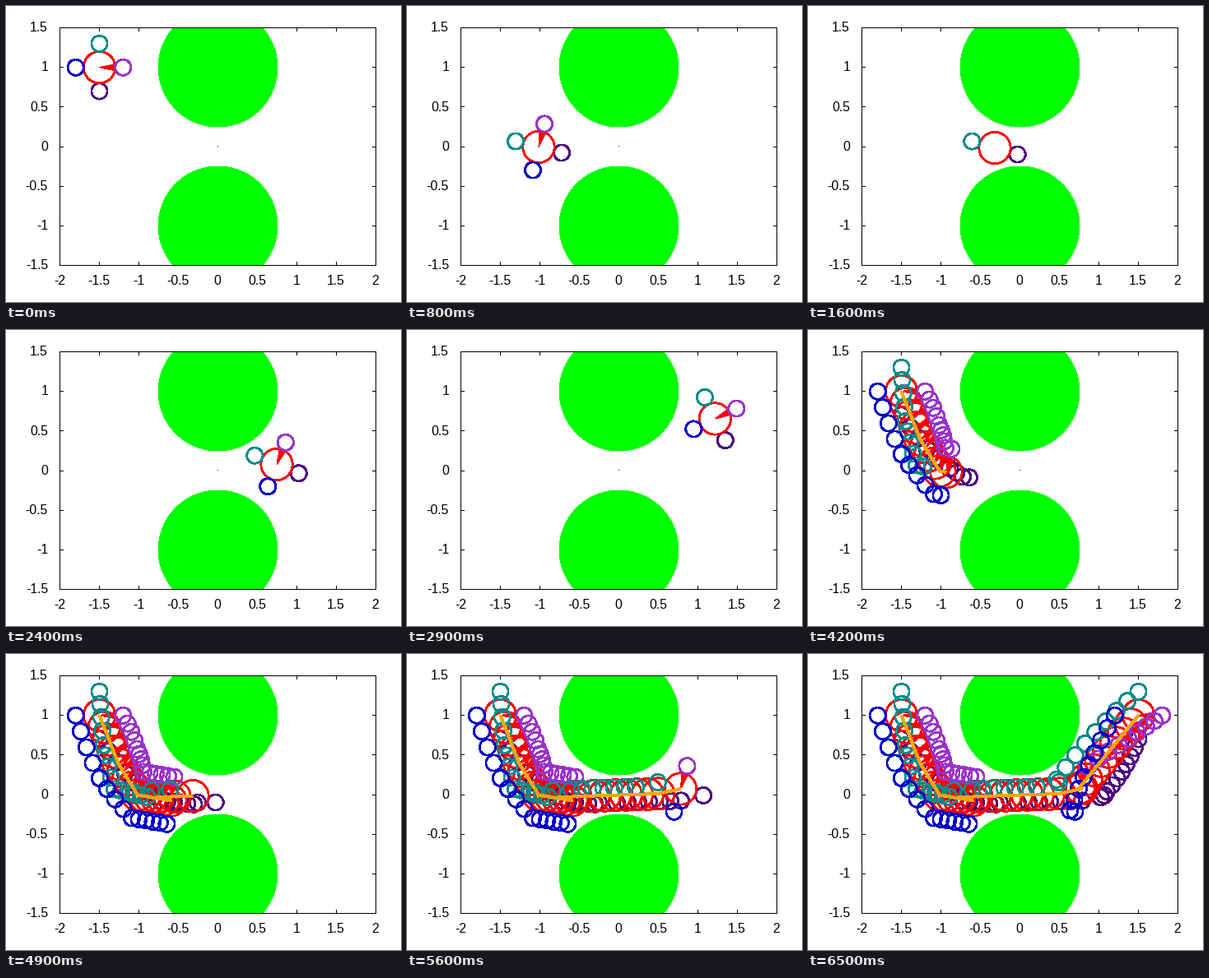
Write a matplotlib script that moves like this. It is 480 px wide and 360 px high and loops after 6.6 s.

```python
import numpy as np
import matplotlib.pyplot as plt
from matplotlib.animation import FuncAnimation
from matplotlib.patches import Circle, Rectangle, Wedge

W, H, DPI = 480, 360, 80
PT = 72 / DPI  # points per pixel
LEFT, RIGHT, TOP, BOTTOM = 65, 449, 26, 315
UNIT = (RIGHT - LEFT) / 4
BODY, ARM, REACH = .2, .1, .3
# colour, angle from heading, z-order
ARMS = [("#4b0082", -90, 3), ("#9932cc", 0, 5),
        ("#008b8b", 90, 6), ("#0000cd", 180, 7)]


def leg(steps, *points):
    """Straight moves through (x, y, heading), with a step count for each."""
    at = np.cumsum([0, *steps])
    return [[np.interp(k, at, col) for col in zip(*points)]
            for k in range(at[-1] + 1)]


def px(x):
    return LEFT + (x + 2) * UNIT


def py(y):
    return BOTTOM - (y + 1.5) * (BOTTOM - TOP) / 3


approach = leg((4, 4, 5), (-1.5, 1, 0), (-1.26, .39, 38),
               (-1.016, -.005, 76), (-.6, -.075, 81))
gap = leg((2, 6), (-.776, -.033, 77), (-.318, -.016, 74), (.5, .011, 73))
leave = leg((1, 8), (.781, .073, 74), (.745, .078, 68), (1.5, 1, 0))
poses = approach + gap + leave
STEPS = len(poses)

fig = plt.figure(figsize=(W / DPI, H / DPI), dpi=DPI, facecolor="white")
ax = fig.add_axes([0, 0, 1, 1])
ax.set_xlim(0, W)
ax.set_ylim(H, 0)
ax.axis("off")


def add(shape, z):
    shape.set(antialiased=False, zorder=z)
    return ax.add_patch(shape)


def ring(x, y, r, color, z):
    return add(Circle((px(x) + .5, py(y) + .5), r * UNIT, fill=False,
                      ec=color, lw=1.7 * PT), z)


def tick(x, y, dx, dy):
    ax.plot([x, x + dx], [y, y + dy], color="black", lw=PT,
            antialiased=False, zorder=.5)


def draw_plot():
    box = (LEFT, TOP), RIGHT - LEFT, BOTTOM - TOP
    for y in (-1, 1):
        disc = add(Circle((px(0) + .5, py(y) + .5), .75 * UNIT + .3,
                          fc="#00ff00", lw=0), 1)
        disc.set_clip_path(Rectangle(*box, transform=ax.transData))
    add(Rectangle(*box, fill=False, ec="black", lw=PT), 10)
    add(Rectangle((px(0), 170), 1, 1, fc="black", lw=0), 1)

    font = dict(family="Liberation Sans", size=15.7 * PT, color="black")
    for v in np.arange(-2, 2.1, .5):
        x = px(v)
        tick(x, BOTTOM, 0, -4)
        tick(x, TOP, 0, 4)
        ax.text(x, 339.4, f"{v:g}", ha="center", va="baseline", **font)
    for v in np.arange(-1.5, 1.6, .5):
        y = py(v)
        tick(LEFT, y, 4, 0)
        tick(RIGHT, y, -4, 0)
        ax.text(51, y + 5.2, f"{v:g}", ha="right", va="baseline", **font)


def make_robot(x, y, heading, folded):
    parts = [ring(x, y, BODY, "red", 4)]
    if not folded:
        # the y axis points down, so angles are negated
        parts.append(add(Wedge((px(x) + .5, py(y) + .5), BODY * UNIT,
                               -heading - 12, -heading + 12,
                               fc="red", lw=0), 4))
    for color, turn, z in ARMS:
        if folded and turn in (0, 180):
            continue
        a = np.radians(heading + turn)
        parts.append(ring(x + REACH * np.cos(a), y + REACH * np.sin(a),
                          ARM, color, z))
    return parts


draw_plot()
robots = [make_robot(*pose, pose in gap) for pose in poses]
xs, ys, _ = np.transpose(poses)
path, = ax.plot([], [], color="#ffa500", lw=3 * PT, antialiased=False,
                solid_capstyle="butt", zorder=8)


def update(i):
    trail, k = divmod(i, STEPS)
    for j, parts in enumerate(robots):
        shown = j == k or (trail == 1 and j < k)
        for p in parts:
            p.set_visible(shown)
    n = k + 1 if trail else 0
    path.set_data(px(xs[:n]) + .5, py(ys[:n]) + .5)
    return [path]


anim = FuncAnimation(fig, update, frames=2 * STEPS, interval=100,
                     init_func=lambda: update(0), repeat=True, repeat_delay=0)
plt.show()
```
